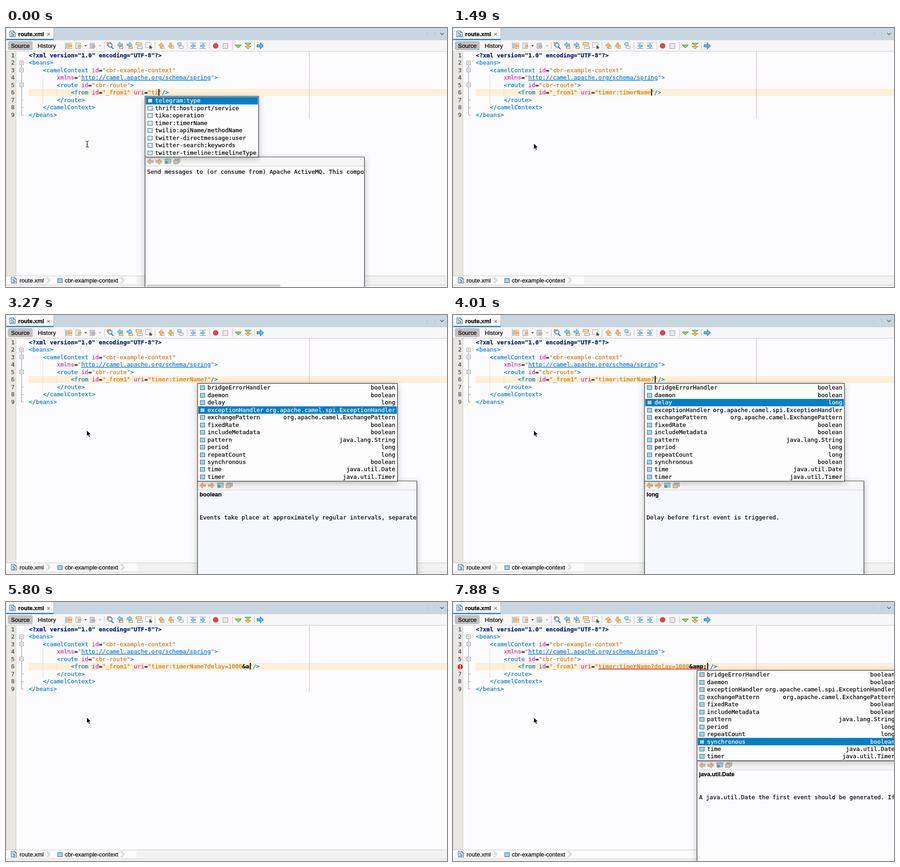
Write an HTML page that moves like this. It is 975 by 574 pixels and loops after 8 s.

```html
<!DOCTYPE html>
<html lang="en">
<head>
<meta charset="utf-8">
<title>Editor completion</title>
<style>
  html, body { margin: 0; width: 100%; height: 100%; overflow: hidden; background: #fcfcfe; }
  svg { display: block; }
  text { white-space: pre; stroke-width: .25px; }
  .mono { font: 12.856px "DejaVu Sans Mono", monospace; }
  .ui { font: 13px "Liberation Sans", Arial, sans-serif; }
  .tab { font: bold 12.7px "Liberation Sans", Arial, sans-serif; }
  .b { font-weight: bold; }
  .u { text-decoration: underline; }
  .popup { filter: drop-shadow(0 3px 7px rgba(0, 0, 0, .26)); }
</style>
</head>
<body>
<svg id="stage" width="975" height="574" viewBox="0 0 975 574">
  <g id="back"></g>
  <g id="live"></g>
</svg>
<script>
const CW = 7.74, ROW = 16.46, X0 = 50.5, Y0 = 64.9, LOOP = 8000;
const TAG = '#0a78d2', ATTR = '#cf2aa2', VAL = '#d07a0c', INK = '#000', NAVY = '#00186f';
const ORANGE = '#f6bd68', RUST = '#c07c22', SKY = '#8fd0f2', BLUE = '#1b75b4', SEL = '#067dc5';

// drawing helpers
const esc = s => s.replace(/&/g, '&amp;').replace(/</g, '&lt;');
const rect = (x, y, w, h, fill, more = '') => `<rect x="${x}" y="${y}" width="${w}" height="${h}" fill="${fill}" ${more}/>`;
const path = (d, stroke, fill = 'none', w = 1) => `<path d="${d}" stroke="${stroke}" fill="${fill}" stroke-width="${w}"/>`;
const text = (x, y, s, ink = INK, cls = 'mono', anchor = 'start') =>
  `<text x="${x}" y="${y}" fill="${ink}" stroke="${ink}" class="${cls}" text-anchor="${anchor}">${esc(s)}</text>`;
const colX = col => X0 + CW * col;
const rowY = row => Y0 + ROW * (row - 1);
const arrow = (x, y, turn, fill, edge, k = 1) =>
  `<path transform="translate(${x} ${y}) rotate(${turn}) scale(${k})" d="M-7-2.5H0V-7L7.5 0 0 7V2.5H-7Z" fill="${fill}" stroke="${edge}"/>`;

// runs: [string, colour, extra class]
function code(row, col, runs) {
  const spans = runs.map(([s, c, cls = '']) => `<tspan fill="${c}" stroke="${c}" class="${cls}">${esc(s)}</tspan>`).join('');
  return `<text x="${colX(col)}" y="${rowY(row)}" class="mono">${spans}</text>`;
}

const attr = (name, value) => [[name, ATTR], ['=', INK], [`"${value}"`, VAL]];

function fileIcon(x, y) {
  return path(`M${x + .5} ${y + .5}h8l4 4v9h-12z`, '#33566f', '#e8f2f8') +
    path(`M${x + 8.5} ${y + .5}v4h4`, '#33566f') +
    path(`M${x + 3} ${y + 4}h3M${x + 3} ${y + 7}h4l3 3M${x + 3} ${y + 11}h6`, '#1d70a8', 'none', 1.7);
}

const chevron = x => path(`M${x} 552l6 7-6 7M${x + 3} 552l6 7-6 7`, '#a5a5a5');
const caretDown = (x, c) => `<path d="M${x - 3} 38h6l-3 3.5z" fill="${c}"/>`;
const box = (x, y, fill = '#9bd3f0', edge = '#3c6078') => rect(x + .5, y + .5, 10, 9, fill, `stroke="${edge}"`);

function toolbar() {
  let s = rect(0, 27, 975, 25, '#f7f7f8') + rect(0, 51, 975, 1, '#c9c9c9');
  s += rect(4, 29, 55, 20, '#c0c0c1', 'rx="4"');
  s += text(11, 44, 'Source', INK, 'ui') + text(70, 44, 'History', INK, 'ui');
  for (const x of [130, 217, 329, 400, 450, 500, 549]) s += rect(x, 31, 1, 17, '#c4c4c4');

  s += path('M132.5 33v13M135 33v13', '#777') + rect(137.5, 33.5, 8, 12, '#fdf3e2', 'stroke="#c89545"') + arrow(141, 39.5, 180, ORANGE, RUST, .65);
  s += rect(154.5, 33.5, 10, 12, '#fff', 'stroke="#8c8c8c"') + path('M157 36.5h5M157 43.5h5', '#aaa') + arrow(162, 40, 180, ORANGE, RUST, .6) + caretDown(176, '#555');
  s += rect(185.5, 33.5, 10, 12, '#cfcfcf', 'stroke="#aaa"') + arrow(193, 41, 180, '#bbb', '#999', .6) + caretDown(208, '#bbb');

  s += rect(223.5, 32.5, 8, 6, ORANGE, `stroke="${RUST}"`) + `<circle cx="230" cy="38" r="4.5" fill="#d5eefa" stroke="${BLUE}" stroke-width="1.5"/>` + path('M233 42l4.500 4.500', BLUE, 'none', 2.3);
  for (const [x, turn] of [[252, 180], [273, 0]])
    s += rect(x - 1.5, 40.5, 8, 5, '#fbdcaa', `stroke="${RUST}"`) + arrow(x, 37, turn, SKY, BLUE, .8);
  s += rect(287.5, 32.5, 12, 5, '#fbdcaa', `stroke="${RUST}"`) + rect(290.5, 40.5, 11, 5, '#f2f2f2', 'stroke="#888"');
  s += rect(308.5, 32.5, 12, 11, 'none', 'stroke="#666" stroke-dasharray="2 1.5"') + '<path d="M317 38v9l2-2 3 2 0-3 2-1z" fill="#555"/>';

  for (const [x, turn] of [[343, -90], [364, 90]])
    s += rect(x + .5, 40.5, 6, 5, '#f2f2f2', 'stroke="#999"') + arrow(x, 39, turn, ORANGE, RUST, .85);
  s += rect(379.5, 32.5, 8, 6, '#b6dff5', 'stroke="#3584b5" rx="2"') + rect(382.5, 39.5, 10, 6, '#f0f0f0', 'stroke="#888" rx="3"');
  for (const [x, turn] of [[414, 180], [435, 0]])
    s += path(`M${x - 7} 33.5h14M${x - 7} 45.5h14`, '#888') + arrow(x, 39.5, turn, SKY, BLUE, .7);
  s += '<circle cx="463.5" cy="39.5" r="5.5" fill="#e6414e" stroke="#c32835"/>' + rect(479.5, 34.5, 11, 11, '#e9e9e9', 'stroke="#999"');
  s += path('M506.5 37.5h14l-7 7z', '#3c8527', '#8fd45a');
  s += path('M528 33.5h14l-7 6z', '#3c8527', '#a6dc6d') + path('M528 40.5h14l-7 6z', '#a87819', '#f3cf55');
  return s + arrow(562, 39.5, 0, '#5cb8ec', '#125f99');
}

function backdrop() {
  let s = rect(0, 0, 975, 574, '#fcfcfe');
  s += rect(0, 0, 975, 27, '#c8d6e0') + rect(1, 0, 104, 27, '#f8fafb') + rect(1, 24, 104, 3, '#4083c9') + rect(105, 0, 1, 27, '#a9bac6');
  s += fileIcon(8, 6) + text(27, 18, 'route.xml', INK, 'tab');
  s += path('M91 11l6 6M97 11l-6 6', '#777', 'none', 1.2);
  s += path('M933 9l-4 4 4 4M946 9l4 4-4 4', '#aebbc5') + path('M960 11l4 4 4-4', '#53606a', 'none', 1.5);
  s += toolbar();

  s += rect(0, 52, 1, 497, '#d0d0d0') + rect(1, 52, 21, 497, '#e9e8e4') + rect(21.5, 52, 1, 497, '#c9c8c4');
  s += rect(50, 135, 925, 16, '#fcf0d9') + rect(670, 52, 1, 148, '#d6a9d2');
  s += path('M81.5 102v66M112.5 135v16', '#dedede');

  s += path('M34.5 82v111h4M34.5 159.5h4M34.5 176.5h4', '#8c8c8c');
  for (const y of [77, 93, 126]) s += rect(30.5, y - 4, 8, 8, '#fcfcfe', 'stroke="#8c8c8c"') + path(`M32.5 ${y}h4`, '#555');
  for (let n = 1; n < 10; n++) if (n !== 6) s += text(19, rowY(n), String(n), '#4c4c4c', 'mono', 'end');

  s += code(1, 0, [['<?xml version="1.0" encoding="UTF-8"?>', NAVY, 'b']]);
  s += code(2, 0, [['<beans>', TAG]]);
  s += code(3, 4, [['<camelContext ', TAG], ...attr('id', 'cbr-example-context')]);
  s += code(4, 8, [['xmlns', ATTR], ['=', INK], ['"', VAL], ['http://camel.apache.org/schema/spring', TAG, 'u'], ['"', VAL], ['>', TAG]]);
  s += code(5, 8, [['<route ', TAG], ...attr('id', 'cbr-route'), ['>', TAG]]);
  s += code(7, 8, [['</route>', TAG]]) + code(8, 4, [['</camelContext>', TAG]]) + code(9, 0, [['</beans>', TAG]]);

  s += rect(0, 549, 975, 1, '#c4c4c4') + rect(0, 569, 975, 1, '#c4c4c4') + rect(0, 570, 975, 4, '#f5f5f5');
  return s + fileIcon(11, 552) + text(30, 564, 'route.xml', INK, 'ui') + chevron(89);
}

const options = `bridgeErrorHandler boolean
daemon boolean
delay long
exceptionHandler org.apache.camel.spi.ExceptionHandler
exchangePattern org.apache.camel.ExchangePattern
fixedRate boolean
includeMetadata boolean
pattern java.lang.String
period long
repeatCount long
synchronous boolean
time java.util.Date
timer java.util.Timer`.split('\n').map(s => s.split(' '));

const names = s => s.split(' ').map(n => [n, '']);
const lists = {
  all: { x: 308, w: 250, rows: names('telegram:type thrift:host:port/service tika:operation timer:timerName twilio:apiName/methodName twitter-directmessage:user twitter-search:keywords twitter-timeline:timelineType') },
  ti: { x: 316, w: 141, rows: names('tika:operation timer:timerName') },
  opts: { x: 424, w: 441, rows: options },
  rest: { x: 540, w: 441, rows: options.filter(o => o[0] !== 'delay') }
};

const docs = {
  mq: { thumb: 296, bg: '#fcfcfe', body: 'Send messages to (or consume from) Apache ActiveMQ. This component extends the Camel JMS component.' },
  tika: { thumb: 458, body: 'Parse documents and extract metadata and text using Apache Tika.' },
  timer: { thumb: 458, body: 'Generate messages in specified intervals using java.util.Timer.' },
  rate: { title: 'boolean', body: 'Events take place at approximately regular intervals, separated by the specified period.' },
  delay: { title: 'long', body: 'Delay before first event is triggered.' },
  date: { title: 'java.util.Date', bg: '#fcfcfe', body: 'A java.util.Date the first event should be generated. If using the URI, the pattern expected is fixed.' }
};

function docPanel(x, y, { title, body, thumb, bg = '#f7f7fe' }) {
  let s = rect(0, 0, 485, 292, bg) + rect(0, 0, 485, 19, '#f6f6f6') + rect(0, 19, 485, 1, '#cfcfcf');
  s += arrow(11, 9.5, 180, '#dfb99b', '#c49b7b', .95) + arrow(30, 9.5, 0, '#dfb99b', '#c49b7b', .95);
  s += rect(43.5, 3.5, 13, 10, '#aecbd6', 'stroke="#8ba8b5"') + '<circle cx="46.5" cy="11.5" r="3.5" fill="#6fa184"/>';
  s += rect(65.5, 3.5, 11, 8, '#bfc9cd', 'stroke="#98a2a6"') + rect(62.5, 6.5, 10, 8, '#d5c6b4', 'stroke="#a39686"');
  if (title) s += text(4, 33, title, INK, 'tab');
  s += text(4, title ? 84.4 : 36.7, body);
  if (thumb) s += rect(3, 282, thumb, 5, '#d2d2d4', 'rx="2.5"');
  return `<g class="popup">${rect(x - .5, y, 485, 291, bg, 'stroke="#111"')}</g>` +
    `<svg x="${x}" y="${y + .5}" width="484" height="290">${s}</svg>`;
}

function listPanel({ x, w, rows }, sel, pale) {
  let s = `<g class="popup">${rect(x - .5, 151.5, w + 1, rows.length * ROW + 2.8, '#fdfdfe', 'stroke="#111"')}</g>`;
  rows.forEach(([name, type], i) => {
    const y = 165.4 + ROW * i, ink = i === sel ? '#fff' : INK;
    if (i === sel) s += rect(x + 1, y - 12.4, w - 2, ROW, SEL);
    s += box(x + 5, Math.round(y - 9), pale ? '#d8e8f1' : undefined) + text(x + 21.5, y, name, ink);
    if (type) s += text(x + w - 4.3, y, type, ink, 'mono', 'end');
  });
  return s;
}

const beam = path('M176 250.5q3 0 3.5 2 .5-2 3.5-2M179.5 252v10M176 264q3 0 3.5-2 .5 2 3.5 2M177.5 258h4', '#222', 'none', 1.2);
const pointer = path('M178.5 255.5v13l3-2.8 2 4.8 2.3-1-2-4.6h4z', '#fff', '#000', .8);

function wave(x, end) {
  let d = `M${x} 149.5`;
  for (let i = 0; x + 2 * i < end; i++) d += `l2 ${i % 2 ? 1.8 : -1.8}`;
  return path(d, '#e02020', 'none', 1.2);
}

function draw({ uri, amp, caret, list, sel, doc, mouse, err, crumb, bar }) {
  const end = 35 + uri.length + amp.length;
  let s = bar < 975 ? rect(bar, 550, 975 - bar, 18, '#f2f2f2') : '';
  if (crumb) s += box(114, 555) + text(130, 564, 'cbr-example-context', INK, 'ui') + chevron(253);
  s += code(6, 12, [['<from ', TAG], ...attr('id', '_from1'), [' uri', ATTR], ['=', INK],
    ['"' + uri, VAL], [amp, INK, 'b'], ['"', VAL], ['/>', TAG]]);
  if (err) {
    s += wave(colX(35), colX(end)) + '<circle cx="16" cy="143.5" r="5.8" fill="#d9252b"/>' + rect(15, 139.5, 2, 5, '#fff') + rect(15, 146, 2, 2, '#fff');
  } else s += text(19, rowY(6), '6', '#4c4c4c', 'mono', 'end');
  if (caret) s += rect(Math.round(colX(end) + .5), 135, 2, 15, '#000');
  s += mouse;
  if (list) {
    const l = lists[list];
    if (doc) s += docPanel(l.x, Math.round(154.3 + l.rows.length * ROW), docs[doc]);
    s += listPanel(l, sel, list === 'all' || list === 'ti');
  }
  return s;
}

// each step changes part of the state
const steps = [
  [0, { uri: 'ti', amp: '', caret: 1, list: 'all', sel: 0, doc: 'mq', mouse: beam, err: 0, crumb: 1, bar: 289 }],
  [140, { list: '', doc: '', mouse: pointer }],
  [290, { list: 'ti', caret: 0 }],
  [440, { doc: 'tika' }],
  [590, { caret: 1 }],
  [1040, { caret: 0 }],
  [1190, { sel: 1 }],
  [1340, { doc: 'timer', caret: 1 }],
  [1490, { uri: 'timer:timerName', list: '', doc: '' }],
  [1790, { caret: 0 }],
  [2090, { caret: 1 }],
  [2240, { uri: 'timer:timerName?' }],
  [2530, { list: 'opts', sel: 5, caret: 0 }],
  [2830, { doc: 'rate', caret: 1 }],
  [3120, { sel: 4, caret: 0 }],
  [3270, { sel: 3 }],
  [3420, { sel: 2, doc: 'delay', caret: 1 }],
  [3720, { caret: 0 }],
  [4010, { caret: 1 }],
  [4160, { uri: 'timer:timerName?delay=1000', list: '', doc: '' }],
  [4460, { caret: 0 }],
  [4760, { caret: 1 }],
  [5050, { caret: 0 }],
  [5350, { caret: 1 }],
  [5500, { amp: '&' }],
  [5800, { amp: '&a' }],
  [5950, { amp: '&am' }],
  [6250, { amp: '&amp' }],
  [6550, { amp: '&amp;' }],
  [6700, { err: 1 }],
  [6840, { crumb: 0, bar: 114, caret: 0 }],
  [6990, { list: 'rest', sel: 10 }],
  [7290, { doc: 'date', caret: 1, crumb: 1, bar: 975 }],
  [7580, { caret: 0 }],
  [7880, { sel: 9, caret: 1 }]
];

let state = {};
const scenes = steps.map(([at, change]) => ({ at, state: state = { ...state, ...change } }));
const live = document.getElementById('live');
document.getElementById('back').innerHTML = backdrop();

let shown;
const start = performance.now();
function tick() {
  const t = (performance.now() - start) % LOOP;
  const scene = scenes.findLast(s => s.at <= t);
  if (scene !== shown) live.innerHTML = draw((shown = scene).state);
  requestAnimationFrame(tick);
}
tick();
</script>
</body>
</html>
```
